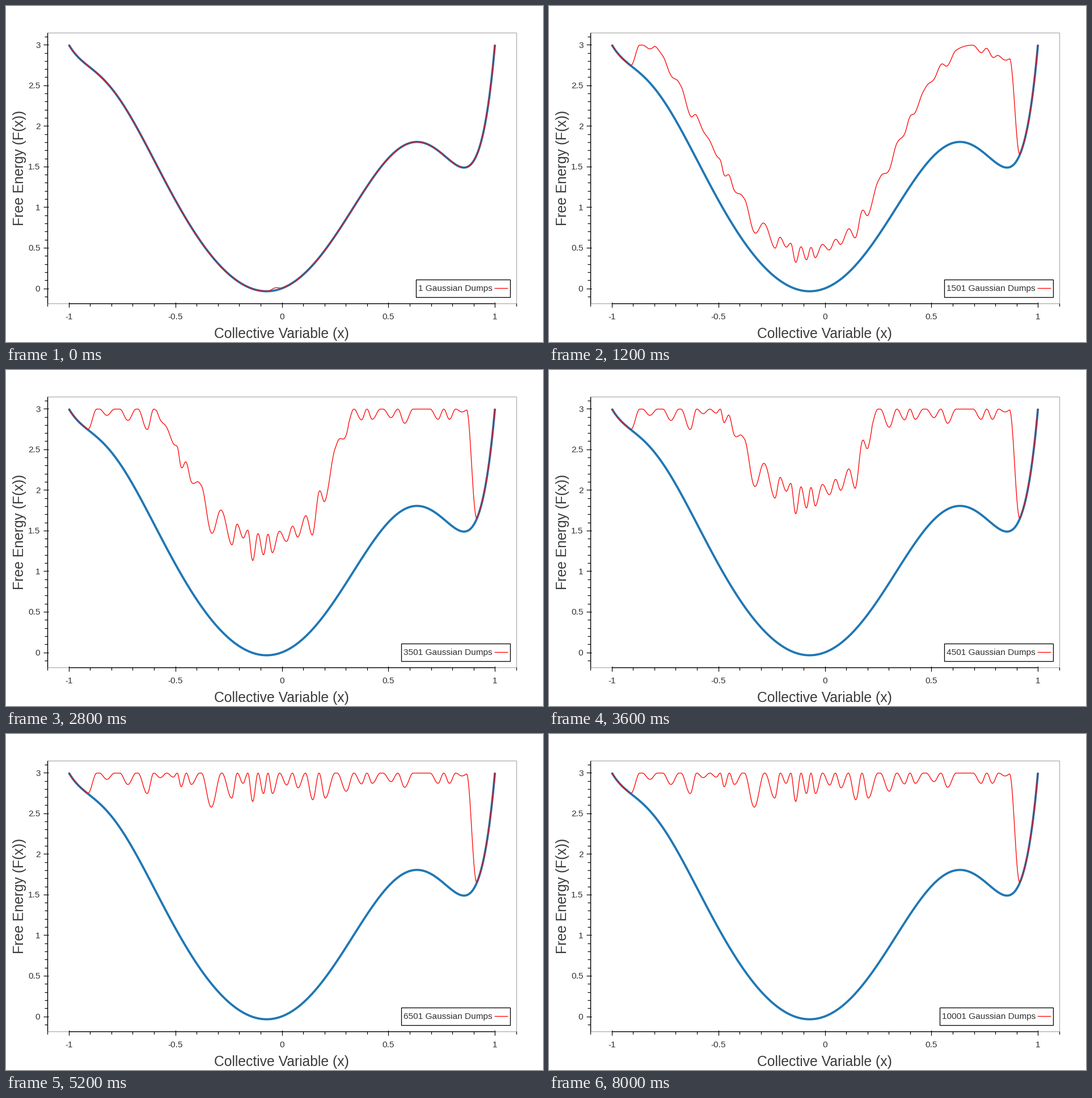
These frames come from a looping animation (947 px wide and 592 px high, 8400 ms). A matplotlib script:

```python
import numpy as np
import matplotlib.pyplot as plt
from matplotlib.animation import FuncAnimation
from matplotlib.patches import Rectangle

W, H, DPI = 947, 592, 100
PT = 72 / DPI
X0, Y0, SX, SY = 486.5, 497.5, 375.75, 143.1
LEFT, RIGHT, TOP, BOTTOM = 73, 900, 46.5, 523.5
CEILING = Y0 - 3 * SY + 0.7
RIM = 143, 831

plt.rcParams["font.family"] = "Liberation Sans"
plt.rcParams["path.simplify"] = False


def energy(x):
    return (x + 7 * x**2 - 0.5 * x**3 - 6.5 * x**4 - 7.5 * x**5 + 7 * x**7
            + 0.5 * x**10 + 2 * x**12 + 0.25 * (x**19 - x**13))


def ease(u):
    return (1 - np.cos(np.pi * np.clip(u, 0, 1))) / 2


# Gaps the dumps leave under the ceiling: position and depth in pixels
gaps = [(178, 11), (215, 20), (249, 36), (272, 8), (295, 7), (309, 24),
        (327, 20), (362, 60), (398, 44), (418, 18), (435, 50), (454, 36),
        (470, 36), (495, 21), (515, 26), (541, 47), (563, 44), (600, 32),
        (627, 19), (646, 18), (679, 15), (703, 25), (762, 18), (782, 18),
        (804, 5)]

xs = np.linspace(X0 - SX, X0 + SX, 1504)
base = Y0 - SY * energy((xs - X0) / SX)


def ripple():
    """Cosine dips, each reaching at most halfway to its neighbour."""
    at = [RIM[0], *(c for c, _ in gaps), RIM[1]]
    y = np.zeros_like(xs)
    for i, (c, depth) in enumerate(gaps, 1):
        widest = 12 + 0.12 * depth
        lo = min((c - at[i - 1]) / 2, widest)
        hi = min((at[i + 1] - c) / 2, widest)
        y += depth * ease(1 - np.abs(xs - c) / np.where(xs < c, lo, hi))
    return y


dips = ripple()
rim = ease((xs - RIM[0]) / 17) * ease((RIM[1] - xs) / 19)
faster = 1 + 1.5 * np.clip((xs - 540) / 240, 0, 1)
bump = 4.5 * np.exp(-0.5 * ((xs - 475) / 6) ** 2)


def profile(k):
    """Bias rises from the surface until it meets the ceiling."""
    gain = (22 * k + 1.2 * k * k) * faster + bump
    crest = np.maximum(np.minimum(CEILING, base), base - gain)
    y = np.minimum(base, crest + min(1, k / 5) * dips)
    return base + (y - base) * rim


fig = plt.figure(figsize=(W / DPI, H / DPI), dpi=DPI, facecolor="white")
ax = fig.add_axes([0, 0, 1, 1])
ax.set_xlim(0, W)
ax.set_ylim(H, 0)
ax.axis("off")


def line(x, y, color="black", width=1.2, **kw):
    return ax.plot(x, y, color=color, lw=width * PT,
                   solid_capstyle="butt", **kw)[0]


def label(x, y, s, size=15.4, color="#303030", **kw):
    return ax.text(x, y, s, fontsize=size * PT, color=color, va="baseline", **kw)


ax.add_patch(Rectangle((LEFT, TOP), RIGHT - LEFT, BOTTOM - TOP, fill=False,
                       ec="#aaaaaa", lw=1.2 * PT))
line(xs, base, "#1f77b4", 3.8, solid_joinstyle="round")
red = line(xs, base, "#ff0000", 1.3, solid_joinstyle="round")

line([LEFT, LEFT], [TOP, BOTTOM], width=1.4)
line([X0 - SX, X0 + SX], [BOTTOM, BOTTOM], width=1.4)
for n in range(-11, 12):
    x = X0 + n / 10 * SX
    major = n % 5 == 0
    line([x, x], [BOTTOM - 2 * major, BOTTOM + (7 if major else 5)])
    if major:
        label(x, 551.5, f"{n / 10:g}".replace("\u2212", "-"), ha="center")
for n in range(-1, 32):
    y = Y0 - n / 10 * SY
    major = n % 5 == 0
    line([LEFT - (7 if major else 5), LEFT + 2 * major], [y, y])
    if major:
        label(60.5, y + 5.5, f"{n / 10:g}", ha="right")
label(486, 584.5, "Collective Variable (x)", 24.8, "#3a3a3a", ha="center")
label(31.5, 285.5, "Free Energy (F(x))", 24.8, "#3a3a3a", ha="center",
      rotation=90, rotation_mode="anchor")

box = Rectangle((723, 481.5), 165.5, 31, fc="white", ec="black",
                lw=1.3 * PT, zorder=4)
ax.add_patch(box)
count = label(858, 502, "", ha="right", zorder=5)
line([861, 885], [497, 497], "#ff0000", 1.3, zorder=5)


def draw(k):
    n = 1 + 500 * k
    left = 723 - 8.56 * (len(str(n)) - 1)
    box.set_x(left)
    box.set_width(888.5 - left)
    count.set_text(f"{n} Gaussian Dumps")
    red.set_ydata(profile(k))
    return red, box, count


anim = FuncAnimation(fig, draw, frames=21, interval=400, repeat=True,
                     repeat_delay=0, blit=False)
plt.show()
```
